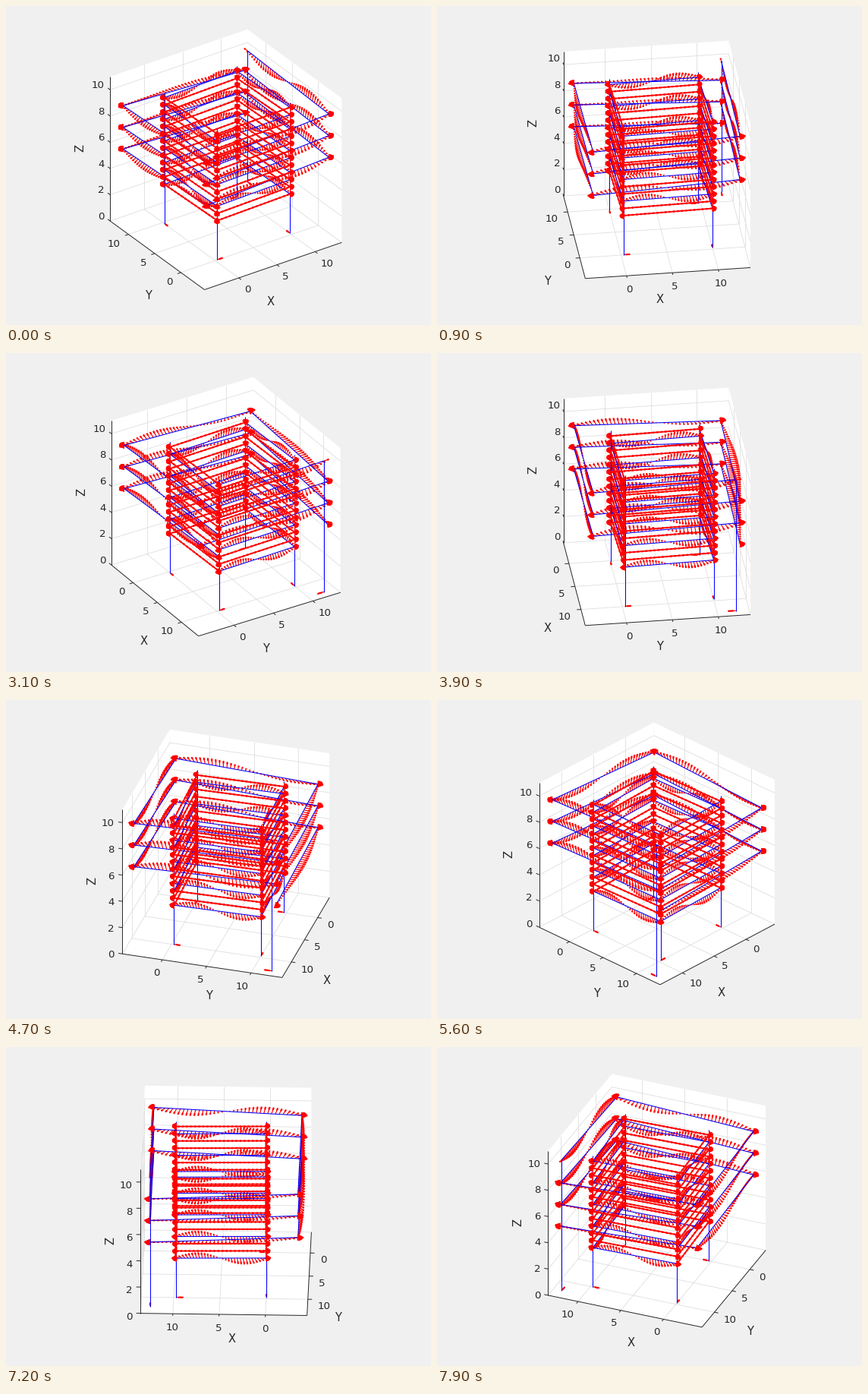
A matplotlib script for the animation above (8000 ms loop, 560 by 420 pixels).

```python
import numpy as np
import matplotlib.pyplot as plt
from matplotlib.animation import FuncAnimation
from matplotlib.collections import LineCollection, PolyCollection

W, H, DPI = 560, 420, 100
FRAMES, STEP, AZ0 = 80, 3, -34.5
R = 9                       # half width of the box, data units
MID = 4.5                   # data value at the box centre
ZMAX = 11
PX, PZ = 219.5 / 18, 219.5 * np.cos(np.pi / 6) / ZMAX
CX, CY = 289.8, 297.2       # floor centre on screen
INK, GRID = '#262626', '#dedede'
RED, BLUE = '#ff0000', '#0000ff'
PITCH = 1.65

fig = plt.figure(figsize=(W / DPI, H / DPI), dpi=DPI, facecolor='#f0f0f0')
ax = fig.add_axes([0, 0, 1, 1])
ax.set_xlim(0, W)
ax.set_ylim(H, 0)
ax.axis('off')


def project(p, a):
    p = np.asarray(p, float)
    x, y, z = p[..., 0], p[..., 1], p[..., 2]
    sx = CX + PX * (x * np.cos(a) + y * np.sin(a))
    sy = CY - PX * 0.5 * (y * np.cos(a) - x * np.sin(a)) - PZ * z
    return np.stack([sx, sy], -1)


def vec(p, z):
    return np.array([p[0], p[1], z])


def frame_of(p, q):
    """Unit tangent and outward normal of a side, both level."""
    t = np.array([q[0] - p[0], q[1] - p[1], 0.0])
    t /= np.hypot(t[0], t[1])
    n = np.array([-t[1], t[0], 0])
    if n @ ((p + q) / 2 - [0.4, 0.3, 0]) < 0:
        n = -n
    return t, n


blue, combs, tips, rows, fans = [], [], [], [], []


def beam(p, q, hump, wave, n_arrows, pull):
    """A blue member with a comb of arrows along it."""
    blue.append([p, q])
    t, n = frame_of(p, q)
    up = np.array([0, 0, 0.7])
    for s in np.linspace(0, 1, n_arrows):
        d = (n * hump * np.sin(np.pi * s) + up * wave * np.sin(2 * np.pi * s)
             + t * pull * (s ** 4 - (1 - s) ** 4))
        b = p + s * (q - p)
        combs.append([b, b + d])
        tips.append([b + 0.6 * d, b + d])


def fan(p, n1, n2, r, dz):
    """Arrow heads turning round a corner, thinning towards the tips."""
    up = np.array([0, 0, dz])
    arc = [p + r * (n1 * np.cos(u) + n2 * np.sin(u))
           for u in np.linspace(0, np.pi / 2, 7)]
    for u, v in zip(arc, arc[1:]):
        fans.append([p + up, u + 0.3 * up, v + 0.3 * up])
        fans.append([p + up, u + 0.3 * up, u - 0.3 * up, p - up])
    fans.append([p + up, arc[-1] + 0.3 * up, arc[-1] - 0.3 * up, p - up])


# Outer winding, three turns downwards
E, F = (8, 7.55), (8, 8)
HH, K, G = (8, -8), (-8, -8), (-8, 8)
sides = [(0.1, -0.85), (0.05, -0.7), (0.5, 0.5), (0.8, -0.1)]
for turn in range(3):
    zs = np.array([10, 9.7, 9.23, 8.88, 8.38]) - turn * PITCH
    pts = [vec(c, z) for c, z in zip([E if turn == 0 else F, HH, K, G, F], zs)]
    normals = [frame_of(p, q)[1] for p, q in zip(pts, pts[1:])]
    for i, (hump, wave) in enumerate(sides):
        beam(pts[i], pts[i + 1], hump, wave, 40, 0.6)
        fan(pts[i + 1], normals[i], normals[(i + 1) % 4], 0.5, 0.22)

# Inner shaft: each post stands a small gap along its own side
GAP = 0.28
A, B, D, C = (-4.5 + GAP, -4.5), (5.5, -4.5 + GAP), (5.5 - GAP, 5.5), (-4.5, 5.5 - GAP)
inner = [A, B, D, C]
for c in inner:
    blue.append([vec(c, 0), vec(c, 10)])
blue.append([vec(E, 0), vec(E, 10)])
for k in range(13):
    z = 3.0 + 0.55 * k
    for i in range(4):
        p, q = vec(inner[i], z), vec(inner[(i + 1) % 4], z)
        t, n = frame_of(p, q)
        if k % 3 == (0 if i in (1, 2) else 2):
            beam(p, q, 0.1, 0.65, 32, 0.5)
        else:
            rows.append([p, q + 0.35 * t])
        fan(q, n, t, 0.42, 0.24)

# Small arrows at the feet
feet = [(A, (0.7, 0)), (B, (0, 0.7)), (D, (-0.75, 0)), (C, (0, -0.7)), (E, (0, -0.85))]
for c, d in feet:
    p = vec(c, 0.02)
    combs.append([p, p + vec(d, 0)])
    tips.append([p + 0.3 * vec(d, 0), p + vec(d, 0)])

blue, combs, tips, rows = map(np.array, (blue, combs, tips, rows))


def lines(color, lw, z, style='solid'):
    c = LineCollection([], colors=color, linewidths=lw, zorder=z, linestyles=style)
    return ax.add_collection(c)


walls = ax.add_collection(PolyCollection([], facecolors='white', zorder=1))
grid = lines(GRID, 0.6, 2)
rules = lines(INK, 0.7, 3)
comb_art = lines(RED, 0.85, 4)
tip_art = lines(RED, 1.6, 5)
blue_art = lines(BLUE, 0.75, 6)
row_art = lines(RED, 1.3, 7)
bead_art = lines(RED, 1.7, 7, (0, (1, 1.3)))
fan_art = ax.add_collection(PolyCollection([], facecolors=RED, edgecolors=RED,
                                           linewidths=0.2, zorder=8))


def label(s, size, **kw):
    return ax.text(0, 0, s, fontsize=size, color=INK, family='DejaVu Sans',
                   va='center_baseline', zorder=9, **kw)


TICKS, ZTICKS = (0, 5, 10), range(0, 11, 2)
x_nums = [label(str(v), 9.6) for v in TICKS]
y_nums = [label(str(v), 9.6) for v in TICKS]
z_nums = [label(str(v), 9.6, ha='right') for v in ZTICKS]
x_name, y_name = (label(s, 10.6, ha='center') for s in 'XY')
z_name = label('Z', 10.6, ha='center', rotation=90)


def screen_dir(d, a):
    return (project(d, a) - project((0, 0, 0), a)) / PX


def put_axis(along, front, nums, name, a, segs):
    """Rule, ticks, numbers and name of one level axis (0 is x, 1 is y)."""
    def at(v, off=0.0):
        p = [0, 0, 0]
        p[along], p[1 - along] = v, front + np.sign(front) * off
        return p
    segs.append(project([at(-R), at(R)], a))
    d = [0, 0, 0]
    d[1 - along] = np.sign(front)
    dx, dy = screen_dir(d, a)
    for v, txt in zip(TICKS, nums):
        base, end = project([at(v - MID), at(v - MID, 0.45)], a)
        segs.append([base, end])
        if dx > 0.2:
            txt.set_ha('left')
            ox = 13 * dx
        elif dx < -0.2:
            txt.set_ha('right')
            ox = 13 * dx
        else:
            txt.set_ha('center')
            ox = 25 * dx
        txt.set_position((base[0] + ox, base[1] + 8 + 36 * dy * dy))
    m = project(at(0), a)
    ox = np.interp(abs(dx), [0.13, 0.38, 0.57, 0.82, 0.92, 0.96, 1],
                   [-11, -7.5, -3.5, 11, 20.5, 28, 38])
    name.set_position((m[0] + np.sign(dx) * ox, m[1] + 30.4 + 26 * abs(dx)))


def draw(i):
    a = np.radians(AZ0 + STEP * i)
    fx = R if np.sin(a) > 0 else -R
    fy = -R if np.cos(a) > 0 else R

    floor = [(-R, -R, 0), (R, -R, 0), (R, R, 0), (-R, R, 0)]
    back_x = [(-fx, -R, 0), (-fx, R, 0), (-fx, R, ZMAX), (-fx, -R, ZMAX)]
    back_y = [(-R, -fy, 0), (R, -fy, 0), (R, -fy, ZMAX), (-R, -fy, ZMAX)]
    walls.set_verts([project(f, a) for f in (floor, back_x, back_y)])

    g = []
    for v in TICKS:
        t = v - MID
        g += [[(t, fy, 0), (t, -fy, 0)], [(t, -fy, 0), (t, -fy, ZMAX)],
              [(fx, t, 0), (-fx, t, 0)], [(-fx, t, 0), (-fx, t, ZMAX)]]
    for v in ZTICKS:
        g += [[(-fx, -R, v), (-fx, R, v)], [(-R, -fy, v), (R, -fy, v)]]
    grid.set_segments(project(g, a))

    segs = []
    put_axis(0, fy, x_nums, x_name, a, segs)
    put_axis(1, fx, y_nums, y_name, a, segs)

    # The upright axis stands at the leftmost corner
    ends = [((fx, -fy), (0, -np.sign(fy))), ((-fx, fy), (-np.sign(fx), 0))]
    corner, out = min(ends, key=lambda e: project(vec(e[0], 0), a)[0])
    segs.append(project([vec(corner, 0), vec(corner, ZMAX)], a))
    dx, dy = screen_dir(vec(out, 0), a)
    for v, txt in zip(ZTICKS, z_nums):
        p = vec(corner, v)
        b, e = project([p, p + 0.45 * vec(out, 0)], a)
        segs.append([b, e])
        txt.set_position((b[0] + 7.2 * dx - 3.5, b[1] + 26 * dy + 3.7))
    m = project(vec(corner, ZMAX / 2), a)
    z_name.set_position((m[0] - 39.3, m[1]))
    rules.set_segments(segs)

    comb_art.set_segments(project(combs, a))
    tip_art.set_segments(project(tips, a))
    blue_art.set_segments(project(blue, a))
    flat = project(rows, a)
    row_art.set_segments(flat)
    bead_art.set_segments(flat)
    fan_art.set_verts([project(f, a) for f in fans])
    return []


anim = FuncAnimation(fig, draw, frames=FRAMES, interval=100, repeat=True,
                     repeat_delay=0, init_func=lambda: draw(0))
plt.show()
```
